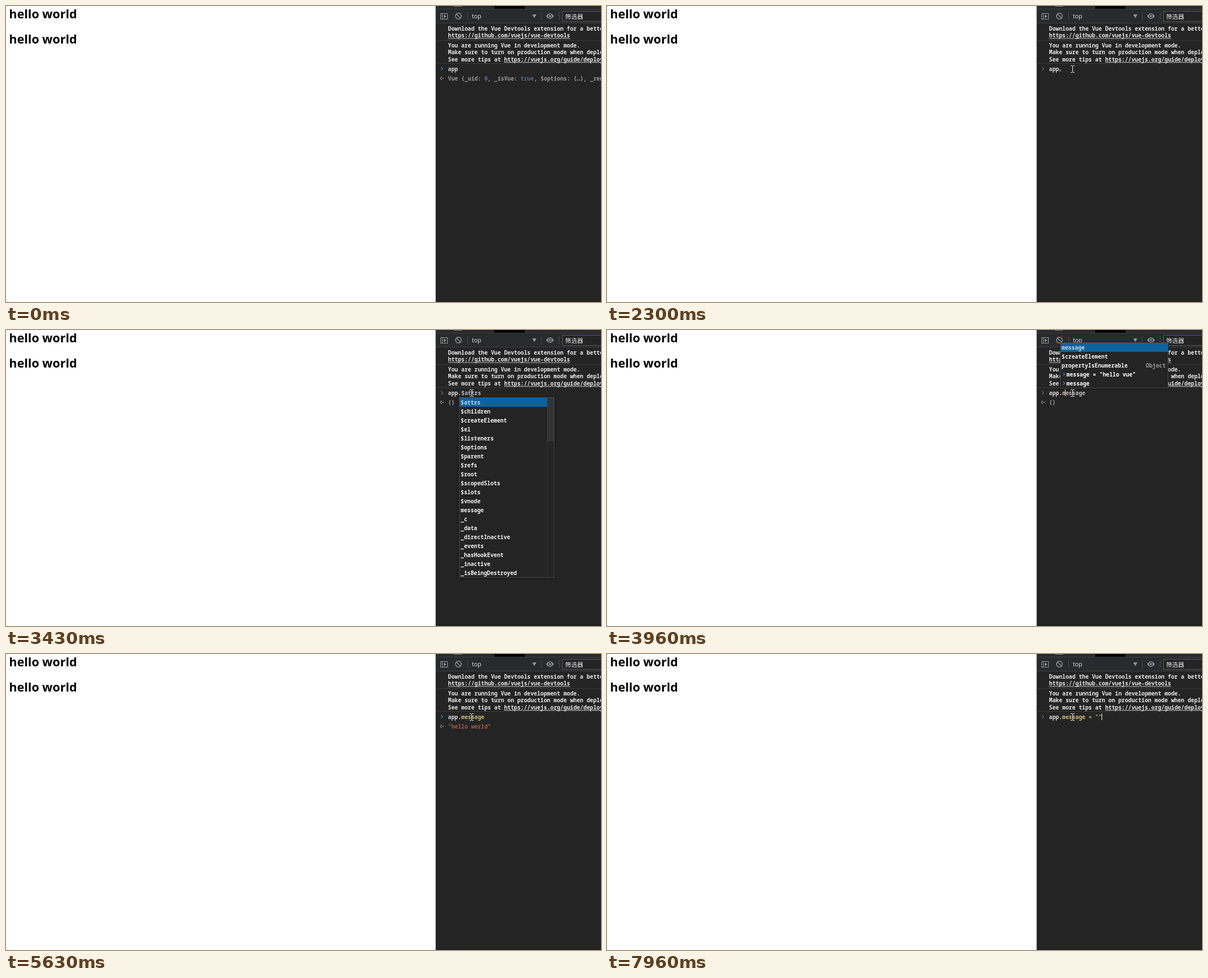
Animation of 1060x528 px, one loop 8000 ms. Source, as an HTML page with a canvas:

```html
<!DOCTYPE html>
<html>
<head>
<meta charset="utf-8">
<style>
html, body { margin: 0; width: 100%; height: 100%; overflow: hidden; background: #fff }
canvas { display: block }
</style>
</head>
<body>
<canvas id="stage" width="1060" height="528"></canvas>
<script>
const g = document.getElementById('stage').getContext('2d');
const LOOP = 8000, CELL = 5.88, PROMPT = 787.5;
const MONO = 'bold 9.8px "Noto Sans Mono", monospace';
const CJK = '10.7px "Noto Sans CJK SC", "Noto Sans CJK", sans-serif';
const WHITE = '#e6e6e6', TYPED = '#d8d8d8', GHOST = '#bcbcbc', GRAY = '#979797';
const BLUE = '#367cc0', DIM = '#626a78', YELLOW = '#c9bb78', PURPLE = '#5f6485';

function box(x, y, w, h, color) {
  g.fillStyle = color;
  g.fillRect(x, y, w, h);
}

function frame(x, y, w, h, color) {
  g.strokeStyle = color;
  g.lineWidth = 1;
  g.strokeRect(x + .5, y + .5, w - 1, h - 1);
}

function line(color, width, ...points) {
  g.strokeStyle = color;
  g.lineWidth = width;
  g.beginPath();
  points.forEach(([x, y]) => g.lineTo(x, y));
  g.stroke();
}

function triangle(color, ...points) {
  g.fillStyle = color;
  g.beginPath();
  points.forEach(([x, y]) => g.lineTo(x, y));
  g.fill();
}

function disc(x, y, r, color) {
  g.fillStyle = color;
  g.beginPath();
  g.arc(x, y, r, 0, 7);
  g.fill();
}

// Monospaced text centred on row y; returns the x where it ends.
function text(str, x, y, color = WHITE) {
  g.fillStyle = color;
  for (const run of str.split(/([\u3000-\u9fff]+)/)) {
    const wide = /[\u3000-\u9fff]/.test(run);
    g.font = wide ? CJK : MONO;
    g.fillText(run, x, y + (wide ? 4 : 3.5));
    x += run.length * (wide ? 10.7 : CELL);
  }
  return x;
}

function spans(list, x, y) {
  for (const [str, color] of list) x = text(str, x, y, color);
}

function link(str, x, y) {
  const end = text(str, x, y);
  box(x, y + 5, end - x, 1, '#c8c8c8');
}

function chevron(x, y, color, size = 3) {
  line(color, 1.3, [x, y - size], [x + size, y], [x, y + size]);
}

function page() {
  box(0, 0, 1060, 528, '#fff');
  g.fillStyle = '#000';
  g.font = 'bold 21.6px "Open Sans", "Noto Sans", sans-serif';
  g.fillText('hello world', 5.5, 22);
  g.fillText('hello world', 5.5, 67);
}

function toolbar() {
  box(766, 0, 294, 30, '#292a2d');
  box(798, 0, 14, 1, '#8a8a8a');
  box(870, 0, 54, 5, '#000');
  box(766, 5, 294, 1, '#3d3d3d');
  box(766, 30, 294, 1, '#3d3d3d');
  for (const x of [822, 953, 985]) box(x, 11, 1, 14, '#46484b');

  frame(774, 13, 13, 11, '#9a9a9a');
  box(777, 13, 1, 11, '#9a9a9a');
  triangle('#9a9a9a', [780, 15.5], [784.5, 18.5], [780, 21.5]);

  line('#929292', 1.5, [802.2, 14.2], [809.8, 21.8]);
  g.beginPath();
  g.arc(806, 18, 5.2, 0, 7);
  g.stroke();

  g.fillStyle = WHITE;
  g.font = '10.7px "Open Sans", "Noto Sans", sans-serif';
  g.fillText('top', 830, 22);
  triangle('#929292', [937.5, 15], [945, 15], [941.2, 21.5]);

  g.fillStyle = '#929292';
  g.beginPath();
  g.moveTo(962, 18);
  g.quadraticCurveTo(969, 8.5, 976, 18);
  g.quadraticCurveTo(969, 27.5, 962, 18);
  g.fill();
  disc(969, 18, 3.3, '#292a2d');
  disc(969, 18, 1.9, '#929292');

  box(991, 9, 80, 19, '#242424');
  frame(991, 9, 80, 19, '#595959');
  text('筛选器', 996, 18.5);
}

function log() {
  text('Download the Vue Devtools extension for a better development experience:', PROMPT, 40);
  link('https://github.com/vuejs/vue-devtools', PROMPT, 52.5);
  text('You are running Vue in development mode.', PROMPT, 70);
  text('Make sure to turn on production mode when deploying for production.', PROMPT, 82.5);
  const end = text('See more tips at ', PROMPT, 95);
  link('https://vuejs.org/guide/deployment.html', end, 95);
  box(766, 61, 294, 1, '#3a3a3a');
  box(766, 102, 294, 1, '#3a3a3a');
}

const previews = {
  vue: [['Vue {_uid: ', GRAY], ['0', PURPLE], [', _isVue: ', GRAY], ['true', PURPLE],
    [', $options: {…}, _renderProxy: Proxy', GRAY]],
  empty: [['{}', GRAY]],
  hello: [['"hello world"', '#9a5f47']]
};

// Rows starting with ">" come from the history.
const popups = {
  app: { x: 784, y: -10, w: 193, pick: true, rows: ['app', 'onappinstalled',
    '>app.movies.push("半河之上")', '>app.movies', '>app.movies[5]="haha"',
    '>app.message = "hello vue"', '>app.message'] },
  members: { x: 807, y: 120, w: 170, pick: true, scroll: true, rows: ['$attrs', '$children',
    '$createElement', '$el', '$listeners', '$options', '$parent', '$refs', '$root', '$scopedSlots',
    '$slots', '$vnode', 'message', '_c', '_data', '_directInactive', '_events', '_hasHookEvent',
    '_inactive', '_isBeingDestroyed'] },
  me: { x: 807, y: 22, w: 193, pick: true, rows: ['message', '$createElement',
    'propertyIsEnumerable', '>message = "hello vue"', '>message'] },
  value: { x: 861, y: 86, w: 110, rows: ['>"hello vue"'] },
  value2: { x: 869, y: 86, w: 110, rows: ['>"hello vue"'] }
};

function popup({ x, y, w, rows, pick, scroll }) {
  const h = rows.length * 16 + 2;
  g.save();
  g.shadowColor = 'rgba(0,0,0,.5)';
  g.shadowBlur = 4;
  g.shadowOffsetY = 1;
  box(x, y, w, h, '#242424');
  g.restore();
  frame(x, y, w, h, '#484848');
  if (pick) box(x + 1, y + 1, w - (scroll ? 14 : 2), 16, '#0e639c');
  if (scroll) {
    box(x + w - 13, y + 1, 1, h - 2, '#2e2e2e');
    box(x + w - 13, y + 1, 12, 77, '#333');
    frame(x + w - 13, y + 1, 12, 77, '#3c3c3c');
  }
  rows.forEach((row, i) => {
    const cy = y + 9 + i * 16;
    if (row[0] == '>') {
      chevron(x + 5.5, cy, BLUE);
      text(row.slice(1), x + 11.5, cy, '#fff');
    } else {
      text(row, x + 3, cy, pick && !i ? '#c3d8e8' : '#f2f2f2');
    }
    if (row == 'propertyIsEnumerable') text('Object', x + w - 40, cy, GRAY);
  });
}

const app = ['app', TYPED], dotted = ['app.', TYPED];
const done = [dotted, ['message', YELLOW]];
const guess = n => [dotted, ['message'.slice(0, n), YELLOW], ['message'.slice(n), GHOST]];
const quotes = [...done, [' = ', GRAY], ['""', '#a59b86']];

// Each step overrides only what changes at that time.
const steps = [
  [0, { line: [app], caret: 3, on: 0, mark: BLUE, preview: 'vue', popup: '' }],
  [830, { on: 1 }],
  [1360, { on: 0 }],
  [1760, { line: [['app。', TYPED]], caret: 4.82, on: 1 }],
  [1830, { preview: '', mark: DIM }],
  [2300, { on: 0 }],
  [2500, { line: [app], caret: 3, on: 1, mark: BLUE, preview: 'vue', popup: 'app' }],
  [2830, { line: [dotted], caret: 4, mark: DIM }],
  [2900, { line: [dotted, ['$attrs', GHOST]], popup: 'members' }],
  [3030, { preview: 'empty' }],
  [3430, { on: 0 }],
  [3960, { line: guess(1), caret: 5, on: 1, popup: 'me' }],
  [4040, { line: guess(2), caret: 6 }],
  [4110, { preview: 'hello', mark: BLUE }],
  [4560, { on: 0 }],
  [5100, { line: done, caret: 11, on: 1, popup: '' }],
  [5630, { on: 0 }],
  [6180, { on: 1 }],
  [6710, { on: 0 }],
  [6920, { caret: 12, on: 1 }],
  [7040, { line: [...done, [' =', GRAY]], caret: 13, mark: '#45618c', popup: 'value' }],
  [7170, { preview: '' }],
  [7240, { caret: 14, popup: 'value2' }],
  [7700, { line: quotes, caret: 15 }],
  [7830, { popup: '' }],
  [7960, { caret: 16 }]
];

function prompt(s) {
  chevron(775, 112, s.mark);
  spans(s.line, PROMPT, 112);
  if (s.preview) {
    line('#8a8a8a', 1.1, [776.5, 126], [773.5, 129], [776.5, 132]);
    box(777.5, 128, 2, 2, '#8a8a8a');
    spans(previews[s.preview], PROMPT, 129);
  }
  if (s.popup) popup(popups[s.popup]);
  if (s.on) box(Math.floor(PROMPT + s.caret * CELL), 106, 1, 12, '#eee');
}

// The pointer sweeps up past the prompt, then settles on it.
function pointer(t) {
  if (t < 260) return;
  const p = Math.min(1, Math.floor((t - 260) / 68) / 10);
  const rise = 1 - (1 - Math.min(1, p / .7)) ** 2;
  const settle = Math.max(0, (p - .7) / .3);
  const x = Math.round(994 - 165 * rise), y = Math.round(470 - 369 * rise + 11 * settle);
  box(x, y - 5, 1, 11, '#eee');
  for (const dy of [-6, 6]) {
    box(x - 3, y + dy, 3, 1, '#eee');
    box(x + 1, y + dy, 3, 1, '#eee');
  }
}

function draw(now) {
  const t = now % LOOP;
  const state = Object.assign({}, ...steps.filter(([at]) => at <= t).map(([, change]) => change));
  page();
  box(766, 0, 294, 528, '#242424');
  box(765, 0, 1, 528, '#7c7c7c');
  box(766, 525, 294, 3, '#1e1f21');
  toolbar();
  log();
  prompt(state);
  pointer(t);
}

const start = performance.now();
function tick() {
  draw(performance.now() - start);
  requestAnimationFrame(tick);
}
tick();
</script>
</body>
</html>
```
